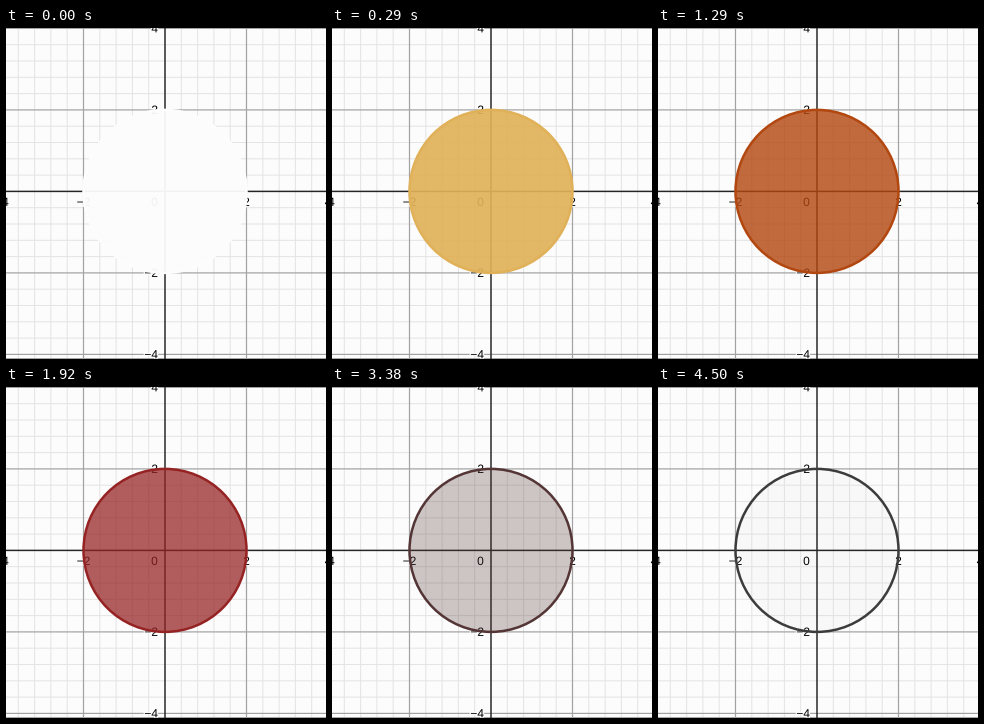
A matplotlib script for the animation above (5000 ms loop, 320 px wide and 331 px high).

```python
import numpy as np
import matplotlib.pyplot as plt
import matplotlib.patheffects as pe
from matplotlib.animation import FuncAnimation
from matplotlib.patches import Circle

W, H, DPI = 320, 331, 64
CX, CY, UNIT = 159.0, 163.4, 40.75
LOOP, INTERVAL = 5000, 40
FADE_END = 3880
PAPER = "#fcfcfc"

plt.rcParams["text.hinting"] = "none"


def px(size):
    """Pixels to points."""
    return size * 72 / DPI


fig = plt.figure(figsize=(W / DPI, H / DPI), dpi=DPI, facecolor=PAPER)
ax = fig.add_axes([0, 0, 1, 1])
ax.set_xlim(0, W)
ax.set_ylim(H, 0)
ax.axis("off")


def rule(value, color, width, z):
    """One vertical and one horizontal line at a graph coordinate."""
    style = dict(color=color, lw=px(width), zorder=z, snap=False)
    ax.axvline(CX + value * UNIT, **style)
    ax.axhline(CY - value * UNIT, **style)


def label(x, baseline, value, align):
    text = str(value).replace("-", "\u2212")
    ax.text(x, baseline, text, ha=align, va="baseline", color="black",
            family="Liberation Sans", fontsize=px(12), zorder=4,
            path_effects=[pe.withStroke(linewidth=px(2.5), foreground=PAPER)])


for step in range(-10, 11):
    if step % 5:
        rule(step * 0.4, "#e4e4e4", 1, 1)
for value in (-4, -2, 2, 4):
    rule(value, "#a2a2a2", 1.2, 2)
    label(CX + value * UNIT, 178, value, "center")
    label(152, CY - value * UNIT + 4, value, "right")
rule(0, "#262626", 1.5, 3)
label(151.8, 178, 0, "right")
ax.axhline(H - 0.5, color="#a6a6a6", lw=px(1), zorder=2, snap=False)

disc = Circle((CX, CY), 2 * UNIT, lw=0, zorder=5)
ring = Circle((CX, CY), 2 * UNIT, fill=False, lw=px(2.5), zorder=6)
ax.add_patch(disc)
ax.add_patch(ring)

# White flashes to amber, then cools through red to charcoal.
COLOR_TIMES = [0, 388, 830, 1920, FADE_END]
COLORS = np.array([(253, 253, 253), (213, 147, 24), (198, 96, 3),
                   (150, 35, 35), (60, 60, 60)]) / 255
ALPHA_TIMES = [0, 830, 1920, 2710, 3380, FADE_END]
ALPHAS = [0.95, 0.86, 0.735, 0.505, 0.27, 0.015]


def update(frame):
    t = min(frame * INTERVAL, FADE_END)
    color = [np.interp(t, COLOR_TIMES, channel) for channel in COLORS.T]
    disc.set_facecolor((*color, np.interp(t, ALPHA_TIMES, ALPHAS)))
    ring.set_edgecolor(color)
    return disc, ring


anim = FuncAnimation(fig, update, frames=LOOP // INTERVAL, interval=INTERVAL,
                     repeat=True, repeat_delay=0, blit=False)
plt.show()
```
